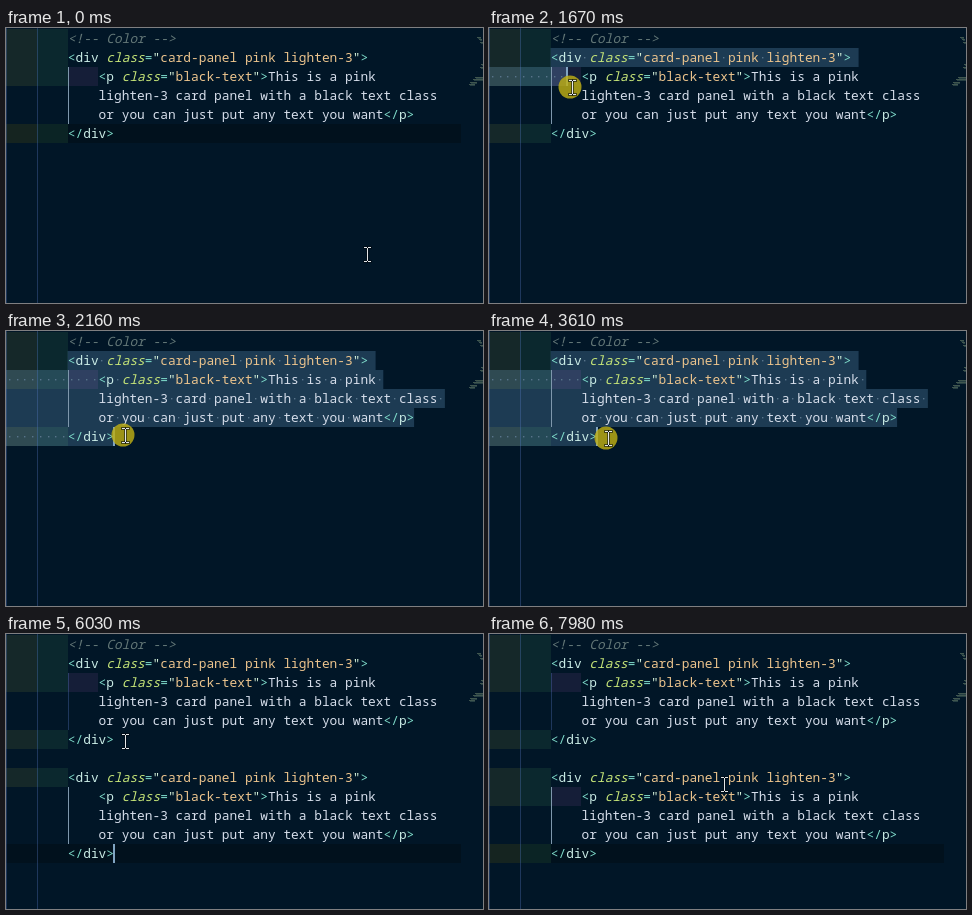
An HTML page with a canvas that plays this animation: 477x275 px, repeating every 8000 ms.

```html
<!DOCTYPE html>
<html lang="en">
<head>
<meta charset="utf-8">
<title>Code editor: copy and paste a block</title>
<style>
  html, body { margin: 0; width: 100%; height: 100%; overflow: hidden; background: #011627; }
  canvas { display: block; }
</style>
</head>
<body>
<canvas id="stage" width="477" height="275"></canvas>
<script>
const ctx = document.getElementById('stage').getContext('2d');
const LOOP = 8000, W = 477, H = 275;
const CHAR = 7.7, ROW = 19, TOP = 1, EDGE = 455;
const FONT = '12.83px "Noto Sans Mono", "DejaVu Sans Mono", monospace';

const COLORS = {
  comment: '#637777', punct: '#7fdbca', tag: '#caece6', attr: '#c5e478',
  quote: '#d9f5dd', string: '#ecc48d', text: '#d6deeb'
};
const INDENT_TINTS = ['rgba(255,255,64,.08)', 'rgba(127,255,127,.08)', 'rgba(255,127,255,.08)'];

// Each row: indent column, tokens, and whether it continues a wrapped line.
const openTag = (name, value) => [
  ['punct', '<'], ['tag', name], ['attr', ' class'], ['punct', '='],
  ['quote', '"'], ['string', value], ['quote', '"'], ['punct', '>']
];
const closeTag = name => [['punct', '</'], ['tag', name], ['punct', '>']];
const makeRow = (indent, tokens, wrapped = false) => ({
  indent, tokens, wrapped,
  end: indent + tokens.reduce((n, [, s]) => n + s.length, 0)
});
const block = [
  makeRow(8, openTag('div', 'card-panel pink lighten-3')),
  makeRow(12, [...openTag('p', 'black-text'), ['text', 'This is a pink ']]),
  makeRow(12, [['text', 'lighten-3 card panel with a black text class ']], true),
  makeRow(12, [['text', 'or you can just put any text you want'], ...closeTag('p')], true),
  makeRow(8, closeTag('div'))
];
const comment = makeRow(8, [['comment', '<!-- Color -->']]);
const blank = makeRow(0, []), indented = makeRow(8, []);

function rowsAt(t) {
  const rows = [comment, ...block];
  if (t >= 6030) return [...rows, blank, ...block];
  if (t >= 5050) return [...rows, blank, indented];
  if (t >= 4450) return [...rows, indented];
  return rows;
}

// Pointer path: time, x, y.
const PATH = [
  [0, 361, 226], [30, 356, 223], [140, 310, 195], [300, 210, 125], [550, 92, 58],
  [800, 66, 43], [920, 66, 42], [1110, 65, 36], [1440, 65, 36], [1890, 100, 80],
  [2160, 119, 104], [2390, 119, 104], [2520, 119, 105], [3510, 119, 105],
  [3610, 119, 107], [7000, 119, 107], [7450, 162, 154], [7610, 162, 154], [7980, 235, 150]
];
function pointerAt(t) {
  const i = PATH.findIndex(p => p[0] > t);
  if (i < 0) return PATH[PATH.length - 1].slice(1);
  const [t0, x0, y0] = PATH[i - 1], [t1, x1, y1] = PATH[i];
  const k = (t - t0) / (t1 - t0);
  return [x0 + (x1 - x0) * k, y0 + (y1 - y0) * k];
}

const between = (t, a, b) => t >= a && t < b;
const rowY = i => TOP + i * ROW;
const clamp = (v, lo, hi) => Math.min(hi, Math.max(lo, v));

function caretAt(t, rows) {
  if (t < 1440) return { row: 5, col: 14, on: false };
  if (t < 2520) {
    const [x, y] = pointerAt(Math.max(1440, t - 60));
    const row = clamp(Math.floor((y - TOP) / ROW), 1, 5);
    const min = rows[row].wrapped ? rows[row].indent : 0;
    return { row, col: clamp(Math.round(x / CHAR), min, rows[row].end), on: true };
  }
  if (t < 4300) return { row: 5, col: 14, on: !between(t, 3000, 3510) && t < 4100 };
  if (t < 5050) return { row: 6, col: 8, on: t < 4780 };
  if (t < 6030) return { row: 7, col: 8, on: t < 5530 };
  return { row: 11, col: 14, on: t < 6640 || between(t, 7140, 7640) };
}

function fill(color, x, y, w, h) {
  ctx.fillStyle = color;
  ctx.fillRect(x, y, w, h);
}

function drawSelection(rows, caret) {
  for (let i = 1; i <= caret.row; i++) {
    const from = i === 1 ? 8 : 0;
    const to = i === caret.row ? caret.col : rows[i].end + (rows[i].wrapped && i === 3 || i === 2 ? 0 : 1);
    const right = i === 4 && caret.row > 4 ? rows[i].end : to;
    if (right > from) fill('#1d3b53', from * CHAR, rowY(i), (right - from) * CHAR, ROW);
  }
}

function drawIndents(rows, t) {
  rows.forEach((row, i) => {
    if (row.wrapped || (t < 6170 && i > 7)) return;
    for (let level = 0; level * 4 < row.indent; level++) {
      const x = Math.round(level * 4 * CHAR), next = Math.round((level + 1) * 4 * CHAR);
      fill(INDENT_TINTS[level], x, rowY(i), next - x, ROW);
    }
  });
}

function drawGuides(t) {
  const dim = 'rgba(94,129,206,.32)', bright = '#7e97ac';
  const outer = between(t, 4300, 6030);
  fill(dim, 0, 0, 1, H);
  fill(outer ? bright : dim, 31, 0, 1, H);
  fill(t < 4300 ? bright : dim, 62, rowY(2), 1, 3 * ROW);
  if (t >= 6030) fill(bright, 62, rowY(8), 1, 3 * ROW);
}

function drawText(rows) {
  ctx.textAlign = 'left';
  ctx.textBaseline = 'alphabetic';
  rows.forEach((row, i) => {
    let col = row.indent;
    for (const [kind, text] of row.tokens) {
      ctx.font = (kind === 'comment' || kind === 'attr' ? 'italic ' : '') + FONT;
      ctx.fillStyle = COLORS[kind];
      for (const ch of text) ctx.fillText(ch, col++ * CHAR + 0.2, rowY(i) + 14);
    }
  });
}

// Selected spaces show as small dots.
function drawSpaces(rows, caret) {
  for (let i = 1; i <= caret.row; i++) {
    const row = rows[i];
    const line = (row.wrapped ? '_' : ' ').repeat(row.indent) + row.tokens.map(p => p[1]).join('');
    const stop = i === caret.row ? caret.col : line.length;
    for (let col = i === 1 ? 8 : 0; col < stop; col++)
      if (line[col] === ' ') fill('#58748a', Math.round((col + 0.4) * CHAR), rowY(i) + 9, 1.4, 1.4);
  }
}

function drawMinimap(t) {
  const shift = t >= 6030 ? 10 : t >= 5050 ? 4 : t >= 4300 ? 2 : 0;
  const marks = [[471, 9, 4], [473, 11, 3], [474, 14, 3], [475, 36, 2], [474, 39, 3],
                 [469, 49, 8], [467, 51, 10], [464, 54, 7], [463, 56, 6]];
  for (const [x, y, w] of marks) {
    fill('#40564f', x, y + shift, w, 1);
    fill('#263f43', x + 1, y + shift + 1, w - 1, 1);
  }
}

function drawPointer(t) {
  const [x, y] = pointerAt(t).map(Math.round);
  if (between(t, 1440, 2520) || between(t, 3570, 3740)) {
    ctx.fillStyle = 'rgba(190,175,20,.82)';
    ctx.beginPath();
    ctx.arc(x - 2, y, 11.5, 0, Math.PI * 2);
    ctx.fill();
  }
  const beam = (color, grow) => {
    const bar = (dx, dy, w, h) => fill(color, x + dx - grow, y + dy - grow, w + 2 * grow, h + 2 * grow);
    bar(-3, -7, 3, 1);
    bar(1, -7, 3, 1);
    bar(0, -6, 1, 13);
    bar(-3, 7, 3, 1);
    bar(1, 7, 3, 1);
  };
  beam('rgba(0,8,16,.55)', 1);
  beam('#e4e6e8', 0);
}

function draw(t) {
  const rows = rowsAt(t), caret = caretAt(t, rows);
  const selecting = between(t, 1440, 3740);
  fill('#011627', 0, 0, W, H);
  if (selecting) drawSelection(rows, caret);
  else fill('#01111d', 0, rowY(caret.row), EDGE, ROW);
  drawIndents(rows, t);
  drawGuides(t);
  drawText(rows);
  if (selecting) drawSpaces(rows, caret);
  if (caret.on) fill('#80a4c2', Math.floor(caret.col * CHAR), rowY(caret.row), 2, ROW);
  drawMinimap(t);
  drawPointer(t);
}

const start = performance.now();
function tick() {
  draw((performance.now() - start) % LOOP);
  requestAnimationFrame(tick);
}
tick();
</script>
</body>
</html>
```
